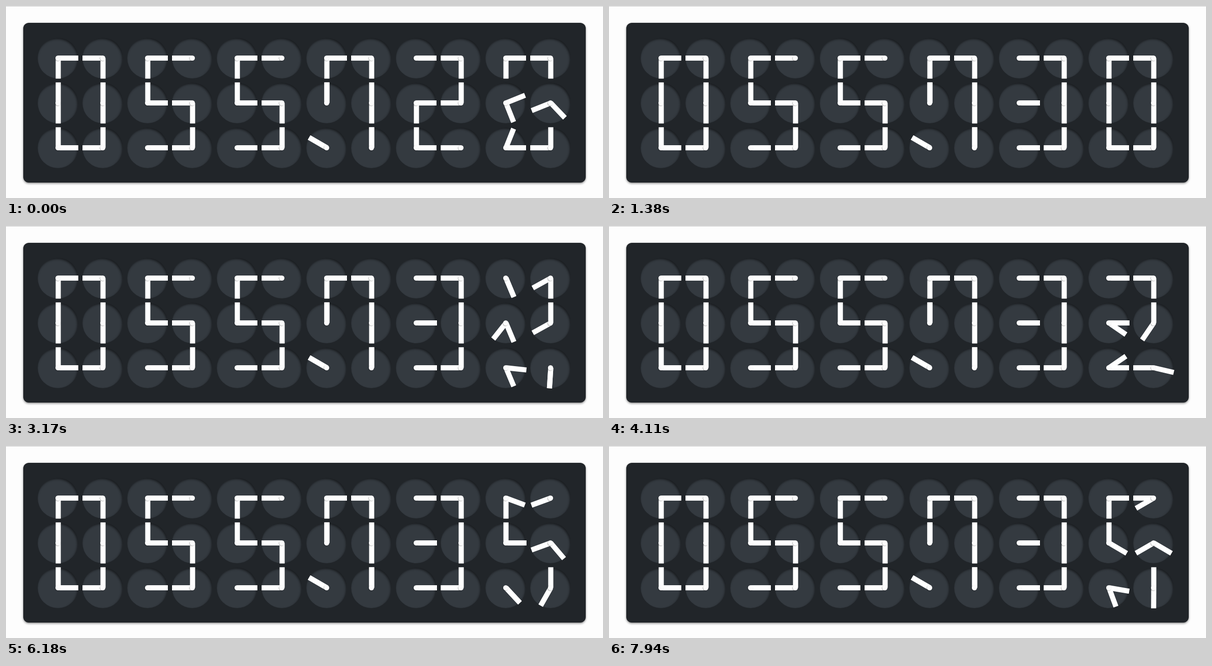
Animation, 1280 px wide and 411 px high, one loop 7990 ms. Source, as an HTML page:

```html
<!DOCTYPE html>
<html lang="en">
<head>
<meta charset="utf-8">
<title>Clock of dials</title>
<style>
  html, body { margin: 0; width: 100%; height: 100%; overflow: hidden; background: #fdfdfd; }
  #stage { position: relative; width: 1280px; height: 411px; overflow: hidden; }
  #stage::before { content: ""; position: absolute; left: 0; top: 0; width: 100%; height: 1px; background: #ccc; }
  #panel {
    position: absolute; left: 37px; top: 36px; width: 1206px; height: 342px;
    border-radius: 12px; background: #212529;
    box-shadow: 0 2px 4px rgba(0, 0, 0, .45);
  }
  .dial {
    position: absolute; width: 87px; height: 87px; border-radius: 50%;
    background: #343a40; box-shadow: inset -2px 3px 4px rgba(0, 0, 0, .5);
  }
  .hand {
    position: absolute; left: 43.5px; top: 38px; width: 43.5px; height: 11px;
    background: #fff; transform-origin: 0 50%;
  }
  .pin {
    position: absolute; left: 38px; top: 38px; width: 11px; height: 11px;
    border-radius: 50%; background: #fcfcfc;
    box-shadow: -1px 1px 2px rgba(0, 0, 0, .3);
  }
</style>
</head>
<body>
<div id="stage"><div id="panel"></div></div>
<script>
const LOOP = 7990;
const TURN = 500;
const PITCH = 96;
const ANGLE = { U: -90, R: 0, D: 90, L: 180, X: 210 };

// Two hands per dial, dials row by row: top, middle, bottom.
const DIGITS = [
  'DR LD UD DU UR UL',
  'XX DD XX DU XX UU',
  'RR LD RD LU UR LL',
  'RR LD RR DU RR UL',
  'DD DD UR DU XX UU',
  'DR LL UR LD RR UL',
  'DR LL UD LD UR UL',
  'DR LD UU DU XX UU',
  'DR LD RD LD UR UL',
  'DR LD UR DU RR UL'
].map(text => [...text.replace(/ /g, '')].map(key => ANGLE[key]));

const PREFIX = '0557';
const FIRST_SECOND = 28;
const TICKS = [-120, 868, 1848, 2831, 3802, 4813, 5793, 6763, 7775];

const stage = document.getElementById('stage');

function add(parent, className) {
  const el = document.createElement('div');
  el.className = className;
  return parent.appendChild(el);
}

function makeDigit(index) {
  const hands = [];
  for (let i = 0; i < 6; i++) {
    const dial = add(stage, 'dial');
    dial.style.left = 68 + PITCH * (index * 2 + i % 2) + 'px';
    dial.style.top = 67.5 + PITCH * Math.floor(i / 2) + 'px';
    hands.push(add(dial, 'hand'), add(dial, 'hand'));
    add(dial, 'pin');
  }
  return hands;
}

const digits = Array.from({ length: 6 }, (_, i) => makeDigit(i));

function pose(hands, from, to, progress) {
  const a = DIGITS[from], b = DIGITS[to];
  hands.forEach((hand, i) => {
    hand.style.transform = `rotate(${a[i] + (b[i] - a[i]) * progress}deg)`;
  });
}

function draw(time) {
  const tick = TICKS.filter(start => start <= time).length - 1;
  const progress = Math.min(1, (time - TICKS[tick]) / TURN);
  const before = PREFIX + (FIRST_SECOND + tick);
  const after = PREFIX + (FIRST_SECOND + tick + 1);
  digits.forEach((hands, i) => pose(hands, before[i], after[i], progress));
}

const origin = performance.now();
function loop() {
  draw((performance.now() - origin) % LOOP);
  requestAnimationFrame(loop);
}
loop();
</script>
</body>
</html>
```
